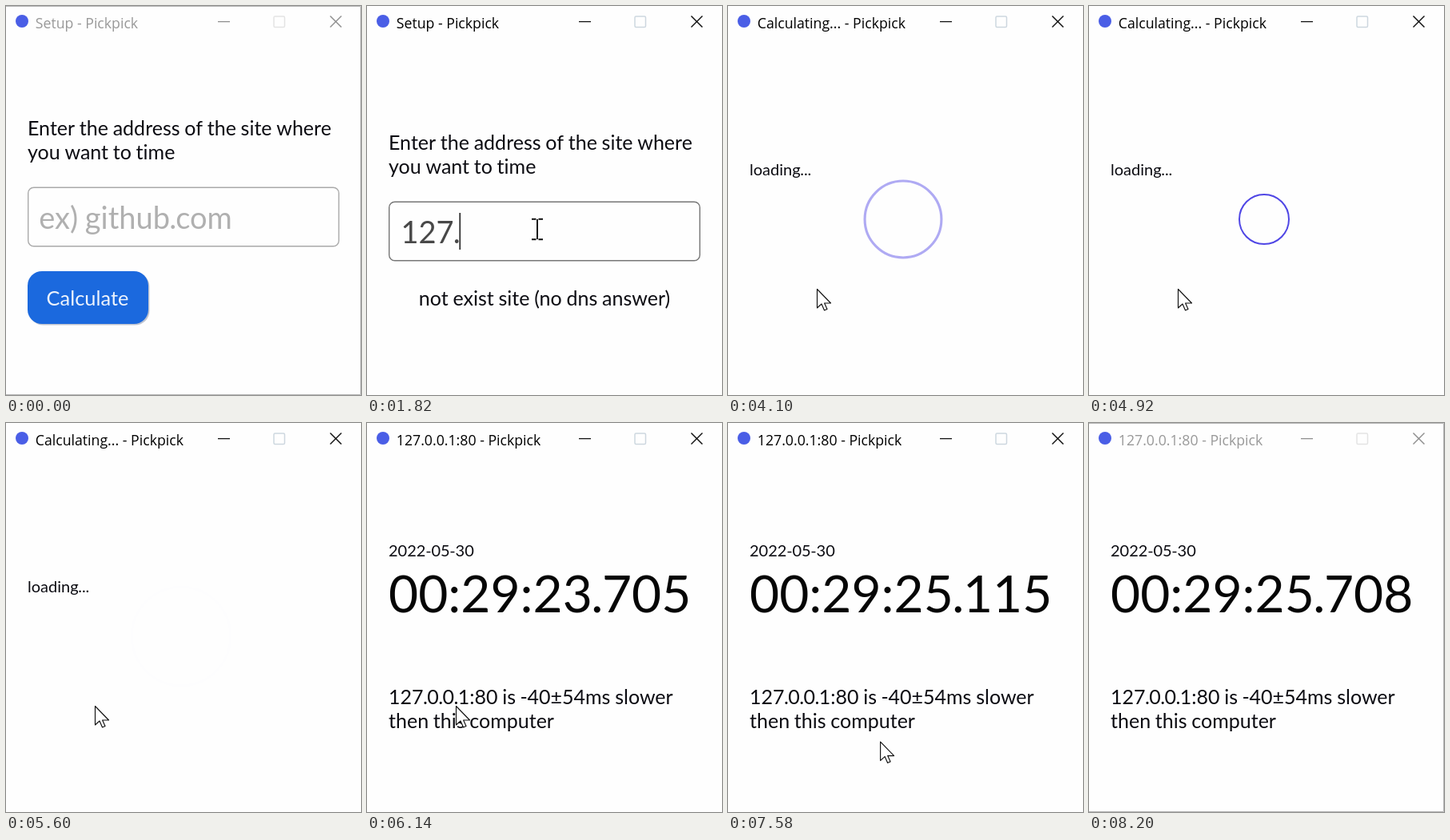
Write an HTML page with a canvas that moves like this. It is 444 px wide and 487 px high and loops after 8270 ms.

```html
<!DOCTYPE html>
<html lang="en">
<head>
<meta charset="utf-8">
<title>Setup</title>
<style>
  html, body { margin: 0; width: 100%; height: 100%; overflow: hidden; background: #fefefe; }
  canvas { display: block; width: 444px; height: 487px; }
</style>
</head>
<body>
<canvas id="stage"></canvas>
<script>
const W = 444, H = 487, LOOP = 8270;
const INK = '#0c0c12', BLUE = '#1b69de', RING = '#4f46e5';
const canvas = document.getElementById('stage');
const ctx = canvas.getContext('2d');
const dpr = window.devicePixelRatio || 1;
canvas.width = W * dpr;
canvas.height = H * dpr;

// Stretches of screen refreshes: first, last, count
const BURSTS = [
  [330, 1090, 12], [3150, 3960, 13], [4030, 4790, 12], [4860, 5670, 13],
  [5730, 6540, 13], [6610, 7370, 12], [7440, 8200, 12]
];
const TYPING = [
  [1500, '1'], [1560, '12'], [1820, '127.'], [2020, '127.0'], [2080, '127.0.'],
  [2280, '127.0.0'], [2350, '127.0.0.'], [2550, '127.0.0.1']
];
const CLOCK = [[5730, 23300], [6135, 23705], [6886.4, 24455], [8200, 25708]];
const FOCUS = 1085, LOADING = 3955, RESULT = 5725, BLUR = 8050;

// Tighter spacing of punctuation, in em
const TIGHT = { '.': 0.047, '-': 0.025, ' ': 0.028 };

const clamp = v => Math.max(0, Math.min(1, v));
const smooth = v => v * v * (3 - 2 * v);
const slowDown = v => 1 - (1 - v) ** 2;

function snap(t) {
  for (const [from, to, count] of BURSTS) {
    const step = (to - from) / (count - 1);
    if (t >= from && t < to + 70) {
      return from + Math.min(count - 1, Math.floor((t - from + 9) / step)) * step;
    }
  }
  return t;
}

function lerpKeys(keys, t) {
  let i = 1;
  while (i < keys.length - 1 && t > keys[i][0]) i++;
  const [a, va] = keys[i - 1], [b, vb] = keys[i];
  return va + (vb - va) * clamp((t - a) / (b - a));
}

const between = (a, b, p) => [0, 1].map(i => a[i] + (b[i] - a[i]) * p);

// cubic-bezier(0, 0, .2, 1)
function easeOut(x) {
  let lo = 0, hi = 1;
  for (let i = 0; i < 24; i++) {
    const s = (lo + hi) / 2;
    if (0.6 * s * s * (1 - s) + s * s * s < x) lo = s; else hi = s;
  }
  return smooth(lo);
}

// Draws a line of text and returns its right end
function text(str, x, y, size, color = INK, centered = false) {
  ctx.font = `${size}px Lato, sans-serif`;
  ctx.letterSpacing = '0.01px'; // turns ligatures off
  ctx.fillStyle = color;
  const width = s => ctx.measureText(s).width;
  const parts = [];
  let prefix = '', shift = 0;
  for (const part of str.split(/(\.+|[- ])/)) {
    const half = (TIGHT[part[0]] || 0) * size / 2;
    prefix += part;
    shift += half;
    parts.push([part, width(prefix) - width(part) - shift]);
    shift += half;
  }
  const total = width(str) - shift;
  const left = centered ? x - total / 2 : x;
  for (const [part, dx] of parts) ctx.fillText(part, left + dx, y);
  return left + total;
}

function line(color, width, ...points) {
  ctx.strokeStyle = color;
  ctx.lineWidth = width;
  ctx.beginPath();
  points.forEach(([x, y], i) => i ? ctx.lineTo(x, y) : ctx.moveTo(x, y));
  ctx.stroke();
}

function box(x, y, w, h, r) {
  ctx.beginPath();
  ctx.roundRect(x, y, w, h, r);
}

function titleBar(title, active) {
  ctx.fillStyle = '#4a5ee6';
  ctx.beginPath();
  ctx.arc(20, 19, 8, 0, Math.PI * 2);
  ctx.fill();
  ctx.font = '17.7px "Open Sans", sans-serif';
  ctx.letterSpacing = '0px';
  ctx.fillStyle = active ? '#000' : '#999';
  ctx.fillText(title, 36.8, 27.5);
  const mark = active ? '#111' : '#8f8f8f';
  line(mark, 1.3, [265, 19.6], [280, 19.6]);
  line(mark, 1.5, [405.5, 12.5], [419.5, 26.5]);
  line(mark, 1.5, [419.5, 12.5], [405.5, 26.5]);
  ctx.strokeStyle = active ? '#cdd7df' : '#e4e4e4';
  ctx.lineWidth = 1.5;
  box(335, 13, 13.5, 13.5, 1.5);
  ctx.stroke();
  if (!active) line('#b8b8b8', 1, [0, 0.5], [443.5, 0.5], [443.5, 486.5], [0, 486.5]);
}

function button(hover) {
  ctx.fillStyle = hover ? '#b3b8c2' : '#bfc4d0';
  box(hover ? 28 : 28.5, hover ? 334.5 : 333.5, 151, 66, 18);
  ctx.fill();
  ctx.fillStyle = BLUE;
  box(27, 332, 151, 66, 18);
  ctx.fill();
  text('Calculate', 102, 374.5, 25.4, '#edf3fc', true);
}

function setup(t) {
  let value = '';
  for (const [at, str] of TYPING) if (t >= at) value = str;
  const missing = t >= 1500 && t < 2550;
  const y = missing ? 18 : 0;
  const focused = t >= FOCUS;

  text('Enter the address of the site where', 27, 161.5 + y, 25);
  text('you want to time', 27, 191.5 + y, 25);
  ctx.strokeStyle = focused ? '#777' : '#aaa';
  ctx.lineWidth = 1.4;
  box(27.7, 227.2 + y, 388.6, 73.6, 7);
  ctx.stroke();
  if (!value) text('ex) github.com', 41.2, 278.5, 38, '#b0b0b0');
  const caret = text(value, 42.5, 278.5 + y, 38, '#484848');
  if (focused) {
    ctx.fillStyle = '#333';
    ctx.fillRect(caret - 0.5, 241 + y, 1.8, 46);
  }
  if (missing) text('not exist site (no dns answer)', 222, 374.5, 25, INK, true);
  else button(t >= 3350);
}

function loading(t) {
  text('loading...', 27, 211.5, 20);
  const p = easeOut(clamp(((t - 3927.5) % 1000) / 750));
  if (p >= 0.995) return;
  ctx.globalAlpha = 1 - p;
  ctx.strokeStyle = RING;
  ctx.lineWidth = 2 * (1 + p);
  ctx.beginPath();
  ctx.arc(219, 267, 31 * (1 + p), 0, Math.PI * 2);
  ctx.stroke();
  ctx.globalAlpha = 1;
}

function result(t) {
  const seconds = (lerpKeys(CLOCK, t) / 1000).toFixed(3);
  text('2022-05-30', 27, 166.5, 20);
  text('00:29:' + seconds, 27, 237, 64, '#050505');
  text('127.0.0.1:80 is -40±54ms slower', 27, 351.5, 25);
  text('then this computer', 27, 381.5, 25);
}

const SHAPES = {
  arrow: new Path2D('M.5 .5V24L6 19L9.5 27L13 25.4L9.6 18H17.5Z'),
  hand: new Path2D('M-1.5 2C-1.5 -1.5 3 -1.5 3 2V10C4 8.5 7 9 7 11C8 9.7 11 10.3 11 12.2' +
    'C12.5 11.2 15 12 15 14.5V20C15 23 13 24.5 13 27V30H1V27.5C-1 25 -3 22 -5.5 18.5' +
    'C-7.5 15.5 -4.5 13.8 -1.5 17Z'),
  fingers: new Path2D('M3 10V15M7 11V15M11 12.2V16')
};

function pointer(kind, x, y) {
  if (kind === 'beam') {
    line('#fff', 4, [x, y - 12], [x, y + 13]);
    line('#111', 2, [x, y - 12], [x, y + 13]);
    for (const dy of [-12.2, 13.2]) {
      line('#111', 2, [x - 7, y + dy], [x - 1.5, y + dy]);
      line('#111', 2, [x + 1.5, y + dy], [x + 7, y + dy]);
    }
    return;
  }
  ctx.save();
  ctx.translate(x, y);
  ctx.fillStyle = '#fff';
  ctx.strokeStyle = '#111';
  ctx.lineWidth = 1.15;
  ctx.lineJoin = 'round';
  ctx.fill(SHAPES[kind]);
  ctx.stroke(SHAPES[kind]);
  if (kind === 'hand') ctx.stroke(SHAPES.fingers);
  ctx.restore();
}

function mouse(t) {
  if (t < 640 || t >= 8000) return;
  if (t < 3150) {
    const [x, y] = between([470, 545], [213, 279], slowDown(clamp((t - 640) / 470)));
    const inside = x > 27 && x < 417 && y > 227 && y < 301;
    pointer(inside ? 'beam' : 'arrow', x, y);
  } else if (t < LOADING) {
    const [x, y] = between([213, 279], [114, 353], smooth(clamp((t - 3100) / 310)));
    if (y < 301) pointer('beam', x, y);
    else pointer(x < 178 && y > 332 ? 'hand' : 'arrow', x, y);
  } else {
    const [x, y] = between([111, 354], [450, 545], smooth(clamp((t - 7390) / 600)));
    pointer('arrow', x, y);
  }
}

function draw(now) {
  const t = snap(now % LOOP);
  ctx.setTransform(dpr, 0, 0, dpr, 0, 0);
  ctx.fillStyle = '#fefefe';
  ctx.fillRect(0, 0, W, H);
  const [name, screen] = t < LOADING ? ['Setup', setup]
    : t < RESULT ? ['Calculating...', loading]
    : ['127.0.0.1:80', result];
  titleBar(name + ' - Pickpick', t >= FOCUS && t < BLUR);
  screen(t);
  mouse(t);
}

const start = performance.now();
function tick() {
  draw(performance.now() - start);
  requestAnimationFrame(tick);
}
tick();
</script>
</body>
</html>
```
